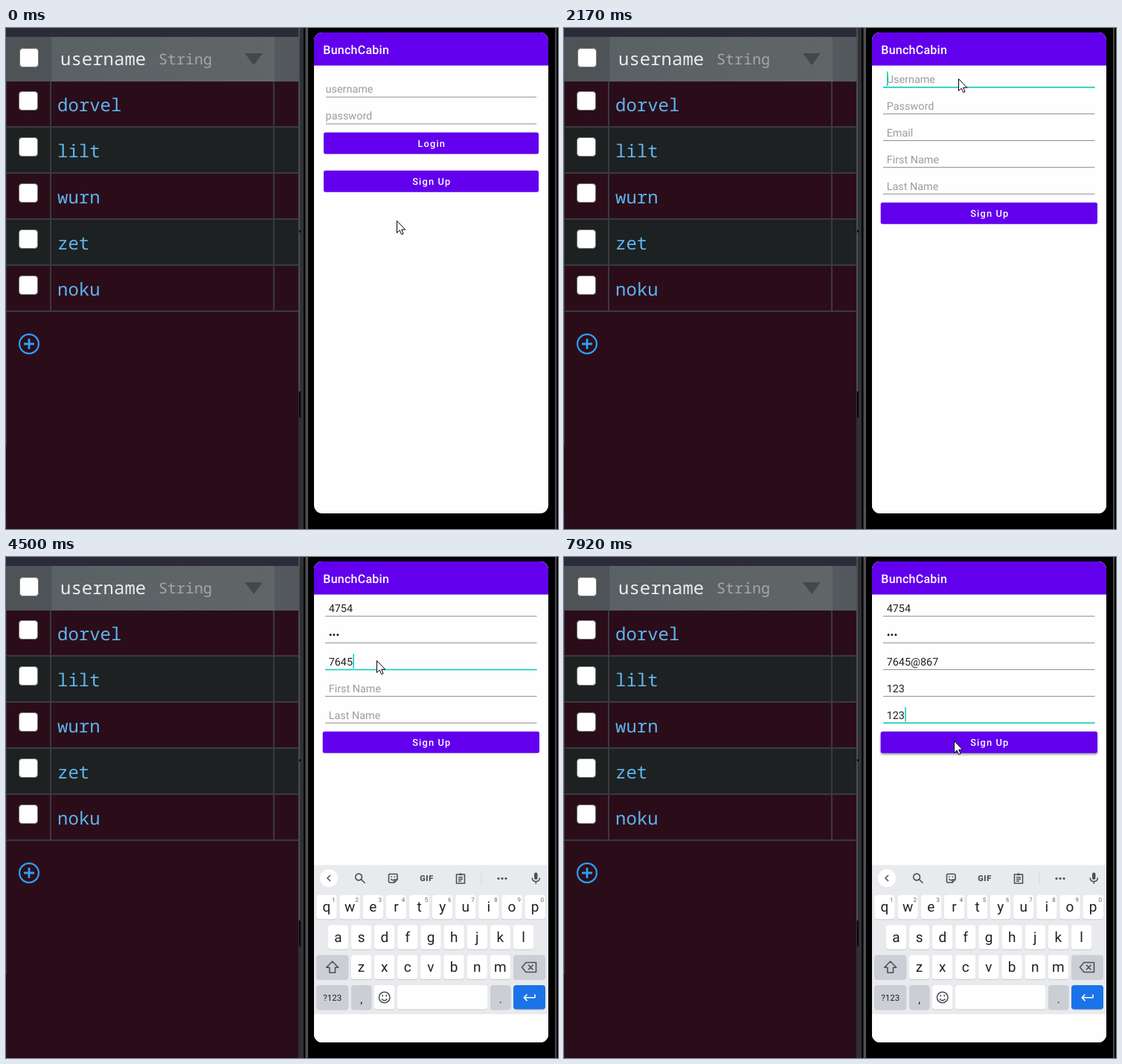
Animation of 742 by 674 pixels, one loop 8 s. Source, as an HTML page:

```html
<!DOCTYPE html>
<html lang="en">
<head>
<meta charset="utf-8">
<title>Sign-up demo</title>
<style>
  html, body { margin: 0; width: 100%; height: 100%; overflow: hidden; background: #000; }
  svg { display: block; width: 742px; height: 674px; }
  text { font-family: Roboto, sans-serif; text-rendering: geometricPrecision; white-space: pre; }
  .mono { font-family: "Noto Sans Mono", monospace; font-size: 24px; }
  .title { font-size: 16px; font-weight: 500; letter-spacing: .25px; fill: #fff; }
  .entry { font-size: 14.4px; fill: #212121; }
  .hint { font-size: 14.4px; fill: #9c9c9c; }
  .label { font-size: 12.83px; font-weight: 500; letter-spacing: 1.15px; fill: #fff; text-anchor: middle; }
  .key { font-size: 19px; fill: #202124; text-anchor: middle; }
  .sup { font-size: 8px; fill: #5f6368; text-anchor: middle; }
  .icon { fill: none; stroke: #4d5156; stroke-width: 1.6; stroke-linejoin: round; }
</style>
</head>
<body>
<svg id="stage" viewBox="0 0 742 674">
  <defs>
    <clipPath id="screen"><rect x="414" y="6" width="315" height="647" rx="11"/></clipPath>
    <filter id="soft" x="-5%" y="-30%" width="110%" height="180%"><feGaussianBlur stdDeviation="1.6"/></filter>
    <linearGradient id="head"><stop offset="0" stop-color="#5a6164"/><stop offset="1" stop-color="#606668"/></linearGradient>
  </defs>

  <rect width="394" height="674" fill="#2b0d1a"/>
  <rect width="394" height="12" fill="#2c2b3a"/>
  <g id="table"></g>
  <rect width="1" height="489" y="72" fill="#3a3a3e"/>
  <rect width="1" height="19" y="655" fill="#10283c"/>
  <g fill="none" stroke="#2fa0f5">
    <circle cx="31" cy="425" r="12.9" stroke-width="2.2"/>
    <path d="M24 425h14M31 418v14" stroke-width="2.8"/>
  </g>

  <rect x="393" width="8" height="674" fill="#303134"/>
  <rect x="393" width="2" height="489" fill="#4b4d50"/>
  <path d="M394 489h2v35h-2zM394 272h2v3h-2z" fill="#050505"/>
  <rect x="400" width="342" height="674"/>
  <rect x="402.5" width="3.5" height="674" fill="#505052"/>
  <rect x="738" width="2" height="674" fill="#4a4a4c"/>

  <g clip-path="url(#screen)">
    <rect x="414" y="6" width="315" height="647" fill="#fefefe"/>
    <g id="login"></g>
    <g id="signup"></g>
    <g id="keyboard"></g>
  </g>
  <path id="pointer" d="M.5 .5V16.6L4.2 13.1L6.7 18.7L9.1 17.7L6.7 12.2H11.7Z" fill="#fff" stroke="#000"/>
</svg>
<script>
const $ = id => document.getElementById(id);
const make = (parent, tag, attrs, content) => {
  const el = document.createElementNS('http://www.w3.org/2000/svg', tag);
  for (const k in attrs) el.setAttribute(k, attrs[k]);
  if (content) el.textContent = content;
  return parent.appendChild(el);
};
const rect = (p, x, y, width, height, fill, rx = 0) => make(p, 'rect', {x, y, width, height, fill, rx});
const text = (p, x, y, cls, s, fill) => make(p, 'text', fill ? {x, y, class: cls, fill} : {x, y, class: cls}, s);
const icon = (p, d, more) => make(p, 'path', {d, class: 'icon', ...more});
const ramp = (t, from, to) => Math.min(1, Math.max(0, (t - from) / (to - from)));
const easeOut = p => 1 - (1 - p) ** 3;

// Data table
function checkbox(x, y) {
  make($('table'), 'rect', {x: x + .5, y: y + .5, width: 25, height: 25, rx: 4, fill: '#fff', stroke: '#767676'});
}
function buildTable() {
  const g = $('table');
  rect(g, 0, 12, 61, 60, '#4d5357');
  rect(g, 61, 12, 300, 60, 'url(#head)');
  rect(g, 361, 12, 32, 60, '#54595d');
  checkbox(18, 27);
  text(g, 73, 50, 'mono', 'username', '#ececec').setAttribute('font-weight', 500);
  text(g, 205, 49, 'mono', 'String', '#aaa59f').style.fontSize = '20px';
  make(g, 'path', {d: 'M321 34h24l-12 16z', fill: '#43484a'});
  ['dorvel', 'lilt', 'wurn', 'zet', 'noku'].forEach((name, i) => {
    const y = 72 + 62 * i;
    if (i % 2) rect(g, 0, y, 393, 61, '#1d2121');
    rect(g, 0, y + 60, 393, 2, '#3b3a3e');
    checkbox(17, y + 13);
    text(g, 69, y + 40, 'mono', name, '#5eb4ee');
  });
  rect(g, 59, 72, 2, 309, '#3b3a3e');
  rect(g, 359, 72, 2, 309, '#3b3a3e');
}

// App screens
function appBar(g) {
  rect(g, 414, 6, 315, 44.5, '#6200ee');
  text(g, 426.3, 34.7, 'title', 'BunchCabin');
}
function button(g, x, y, width, caption) {
  const shade = rect(g, x, y + 2, width, 29, '#000', 3);
  shade.setAttribute('filter', 'url(#soft)');
  rect(g, x, y, width, 29, '#6200ee', 2.5);
  const glow = rect(g, x, y, width, 29, '#fff', 2.5);
  text(g, 572.3, y + 19.2, 'label', caption);
  return (lift, flash) => {
    shade.setAttribute('opacity', .4 * lift);
    glow.setAttribute('opacity', .1 * flash);
  };
}

const login = $('login');
appBar(login);
['username', 'password'].forEach((hint, i) => {
  text(login, 429.6, 86.8 + 36 * i, 'hint', hint);
  rect(login, 430, 92.5 + 36 * i, 283, 1, '#8e8e8e');
});
button(login, 427, 140.5, 289, 'Login')(0, 0);
const openButton = button(login, 427, 191.7, 289, 'Sign Up');

const signup = $('signup');
rect(signup, 414, 6, 315, 647, '#fefefe');
appBar(signup);
const sendButton = button(signup, 425.7, 234.7, 291.3, 'Sign Up');

// click: tap time; the field holds focus 165 ms later. keys: keystroke times.
const LAG = 165;
const fields = [
  {hint: 'Username', value: '4754', click: 1990, keys: [2560, 2690, 2800, 2930]},
  {hint: 'Password', value: '•••', click: 3000, keys: [3200, 3250, 3300]},
  {hint: 'Email', value: '7645@867', click: 3330, keys: [3510, 3580, 4320, 4500, 5120, 5400, 5480, 5570]},
  {hint: 'First Name', value: '123', click: 5945, keys: [6210, 6280, 6350]},
  {hint: 'Last Name', value: '123', click: 6300, keys: [6500, 6560, 6620]}
];
const caretOff = [[4080, 4320], [5000, 5120], [7120, 7840]];

fields.forEach((f, i) => {
  const base = 74 + 35.9 * i;
  f.hintEl = text(signup, 433.7, base, 'hint', f.hint);
  f.entry = text(signup, 433.7, base, 'entry');
  rect(signup, 429, base + 5.2, 284.5, 1, '#8e8e8e');
  f.line = rect(signup, 429, base + 4.9, 284.5, 1.7, '#1ccfbc');
  f.caret = rect(signup, 434, base - 15.5, 1.5, 19.5, '#03cdb9');
  f.end = i < 4 ? fields[i + 1].click + LAG : 9000;
});

// Keyboard
function buildKeyboard() {
  const g = $('keyboard');
  rect(g, 414, 414.5, 315, 200.5, '#e8eaed');
  rect(g, 414, 615, 315, 38, '#fefefe');
  make(g, 'circle', {cx: 434, cy: 432, r: 12, fill: '#fff'});
  icon(g, 'M436 428l-4 4 4 4');
  icon(g, 'M478.5 430.5a4.4 4.4 0 1 1-8.8 0a4.4 4.4 0 1 1 8.8 0M477.5 433.7l5 5', {'stroke-width': 1.9});
  icon(g, 'M516 426.5h8.500q1.500 0 1.500 1.500v6l-4 4h-6q-1.500 0-1.500-1.500v-8.500q0-1.500 1.500-1.500zM526 434h-4v4M517.500 433q2 3 4 1M518 429.500v1.500M522.500 429.500v1.500');
  const gif = text(g, 565.5, 436, 'sup', 'GIF');
  gif.style.cssText = 'font-size:11px;font-weight:900;letter-spacing:.6px;fill:#4d5156';
  icon(g, 'M605.5 427h11v12h-11zM608.5 427.500h5M611 425.300v2M608 431h6M608 433.500h6M608 436h4');
  rect(g, 638.5, 423, 1, 18, '#d4d6da');
  for (const cx of [662, 667, 672]) make(g, 'circle', {cx, cy: 432.5, r: 1.6, fill: '#4d5156'});
  rect(g, 710, 424.5, 4.500, 9.5, '#4d5156', 2.25);
  icon(g, 'M707.3 431.500q0 5 5 5t5-5M712.300 436.500v3.300');

  const cap = (x, y, w, fill) => {
    rect(g, x, y + 1, w, 32.5, '#c9ccd1', 4);
    rect(g, x, y, w, 32.5, fill, 4);
  };
  const grey = '#cbced4';
  [['qwertyuiop', 431], ['asdfghjkl', 446.500], ['zxcvbnm', 477.500]].forEach(([letters, x0], r) => {
    const y = 454.8 + 40.4 * r;
    [...letters].forEach((c, i) => {
      const x = x0 + 31.13 * i;
      cap(x - 13.7, y, 27.4, '#fff');
      text(g, x, y + 22.4, 'key', c);
      if (!r) text(g, x + 9.6, y + 8.8, 'sup', String((i + 1) % 10));
    });
  });
  cap(417.2, 535.6, 43, grey);
  cap(682, 535.6, 43, grey);
  icon(g, 'M438.7 544l8 8.300h-4.200v7h-7.600v-7h-4.200z');
  icon(g, 'M699 545.500h13.500v13h-13.500l-5.500-6.500zM702 548.800l6.500 6.500M708.500 548.800l-6.500 6.500');
  cap(417.2, 576, 43, grey);
  cap(464, 576, 27.4, grey);
  cap(495, 576, 27.4, '#fff');
  cap(526, 576, 121, '#fff');
  cap(651, 576, 27.4, grey);
  cap(682, 576, 43, '#1a73e8');
  text(g, 438.7, 597, 'key', '?123').style.fontSize = '11.5px';
  text(g, 477.7, 600, 'key', ',').style.fontSize = '15px';
  text(g, 664.7, 600, 'key', '.').style.fontSize = '15px';
  icon(g, 'M516 592.500a7.300 7.300 0 1 1-14.600 0a7.300 7.300 0 1 1 14.600 0M505 594.500q3.700 4.500 7.400 0M506.200 589v2.200M511.200 589v2.200');
  icon(g, 'M711 588.500v4.300h-14.500M700.500 588.500l-4.300 4.300 4.300 4.300', {style: 'stroke:#fff'});
}

// Pointer: time, x, y
const path = [
  [0, 525, 259], [29, 525, 259], [30, 521, 238], [69, 521, 238], [70, 518, 217],
  [390, 518, 217], [480, 525, 206], [760, 525, 206], [900, 532, 206],
  [1570, 532, 206], [1960, 530, 68], [2400, 530, 68], [2850, 504, 112], [2910, 504, 112],
  [2990, 503, 104], [3200, 503, 104], [3330, 499, 143], [3859, 499, 143], [3860, 499, 141],
  [4320, 499, 141], [4400, 498, 139], [5600, 498, 139], [5900, 494, 180], [6110, 494, 180],
  [6190, 494, 192], [6290, 496, 207], [6480, 496, 207], [6750, 525, 248],
  [7330, 525, 248], [7400, 524, 247], [8000, 524, 247]
];
function pointerAt(t) {
  const i = path.findIndex(p => p[0] > t);
  const a = path[i - 1], b = path[i], k = ramp(t, a[0], b[0]);
  return [1, 2].map(n => a[n] + (b[n] - a[n]) * k);
}

function drawField(f, t) {
  const count = f.keys.filter(k => k <= t).length;
  const typed = f.value.slice(0, count);
  if (f.entry.textContent !== typed) f.entry.textContent = typed;
  f.hintEl.style.display = count ? 'none' : '';
  f.hintEl.style.fill = t >= f.click && t < f.click + LAG ? '#757575' : '';
  f.line.setAttribute('opacity', t < f.end ? ramp(t, f.click, f.click + 60) : 0);
  const blink = caretOff.some(([a, b]) => t >= a && t < b);
  const shown = t >= f.click + LAG && t < f.end && !blink;
  f.caret.style.display = shown ? '' : 'none';
  if (shown) f.caret.setAttribute('x', 434 + (count ? f.entry.getComputedTextLength() : 0));
}

function draw() {
  const t = performance.now() % 8000;
  $('pointer').setAttribute('transform', `translate(${pointerAt(t)})`);

  const press = ramp(t, 960, 1040) - ramp(t, 1120, 1200);
  openButton(press, press);
  const enter = easeOut(ramp(t, 1310, 1550));
  signup.setAttribute('opacity', enter);
  signup.setAttribute('transform', `translate(0 ${8 * (1 - enter)})`);

  const rise = easeOut(ramp(t, 2290, 2490));
  $('keyboard').setAttribute('opacity', rise);
  $('keyboard').setAttribute('transform', `translate(0 ${24 * (1 - rise)})`);

  fields.forEach(f => drawField(f, t));
  const lift = ramp(t, 7330, 7470);
  sendButton(lift, lift - ramp(t, 7840, 7920));
  requestAnimationFrame(draw);
}

buildTable();
buildKeyboard();
draw();
</script>
</body>
</html>
```
